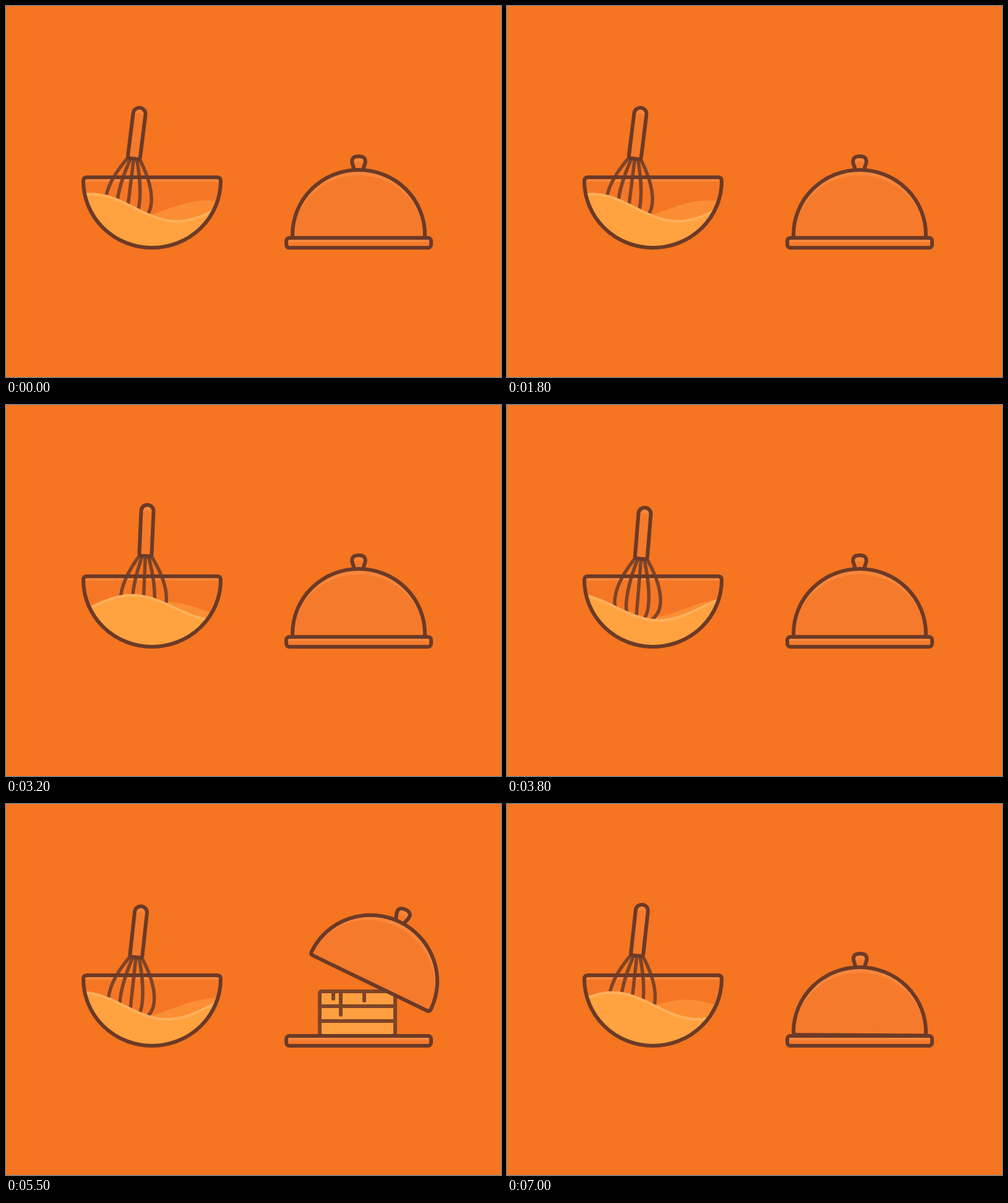
Recreate the animation shown at these times as an HTML page. Size 800 by 600 pixels, loop 7100 ms.

```html
<!DOCTYPE html>
<html lang="en">
<head>
<meta charset="utf-8">
<title>Whisk and cloche</title>
<style>
  html, body { margin: 0; height: 100%; overflow: hidden; background: #f57520; }
  svg { display: block; width: 800px; height: 600px; }
  .line { fill: none; stroke: #6b3a27; stroke-width: 6; stroke-linejoin: round; stroke-linecap: round; }
  .soft { fill: none; stroke: #7e4428; stroke-width: 6; stroke-linecap: round; }
  .glass { fill: #f57a2b; }
  .shine { fill: #f8873c; }
</style>
</head>
<body>
<svg viewBox="0 0 800 600">
  <defs>
    <path id="bowl" d="M131 277H341Q347 277 347 283A111 108 0 0 1 125 283Q125 277 131 277Z"/>
    <path id="dome" d="M467 375Q463 375 463 370A107 105 0 0 1 677 370Q677 375 673 375Z"/>
    <path id="handle" d="M-10 -73A10 10 0 0 1 10 -73V-4Q10 0 6 0H-6Q-10 0 -10 -4Z"/>
    <path id="knob" d="M563 265L559.5 254Q557.5 243 570 243Q582.5 243 580.5 254L577 265"/>
    <clipPath id="inBowl"><use href="#bowl"/></clipPath>
    <clipPath id="inDome"><use href="#dome"/></clipPath>
    <clipPath id="inHandle"><use href="#handle"/></clipPath>
    <clipPath id="inKnob"><use href="#knob"/></clipPath>
  </defs>

  <g clip-path="url(#inBowl)">
    <path fill="#f57725" d="M120 270h232v125H120z"/>
    <path class="shine" d="M120 277h232v7H120z"/>
    <path id="back" fill="#fb8e33"/>
  </g>
  <g id="whisk">
    <g class="soft" style="stroke-width:5.5">
      <path d="M0 0V106"/>
      <path id="wires" d="M-9 -1C-22 18 -37 45 -37 70C-37 95 -15 106 0 106S37 95 37 70C37 45 22 18 9 -1"/>
      <path d="M-5 0C-11 20 -18 45 -18 72C-18 95 -8 106 0 106S18 95 18 72C18 45 11 20 5 0"/>
    </g>
    <g clip-path="url(#inHandle)">
      <use href="#handle" class="shine"/>
      <use href="#handle" class="glass" y="9"/>
    </g>
    <use href="#handle" class="line"/>
  </g>
  <g clip-path="url(#inBowl)">
    <path id="front" fill="#ffb05c"/>
    <path id="body" fill="#ffa23f"/>
  </g>
  <use href="#bowl" class="line"/>

  <path fill="#ff9f40" d="M507 303h122v72H507z"/>
  <path class="soft" d="M511 303H625Q629 303 629 307V370Q629 375 624 375H512Q507 375 507 370V307Q507 303 511 303ZM507 327H629M507 351H629M529 303V315M541 303V341M579 303V318"/>

  <g id="lid">
    <g clip-path="url(#inKnob)">
      <use href="#knob" class="shine"/>
      <use href="#knob" class="glass" y="9"/>
    </g>
    <use href="#knob" class="line"/>
    <g clip-path="url(#inDome)">
      <use href="#dome" class="shine"/>
      <use href="#dome" class="glass" y="9"/>
      <path class="glass" d="M480 366h180v9H480z"/>
    </g>
    <use href="#dome" class="line"/>
  </g>

  <rect x="453" y="375" width="234" height="16" rx="5" class="glass"/>
  <path class="shine" d="M456 377h228v5H456z"/>
  <rect x="453" y="375" width="234" height="16" rx="5" class="line"/>
</svg>
<script>
  const LOOP = 7100, STIR = 1800, WAVELENGTH = 276;
  const $ = id => document.getElementById(id);
  const rad = deg => deg * Math.PI / 180;
  const ease = (t, from, to) => {
    const p = Math.min(1, Math.max(0, (t - from) / (to - from)));
    return (1 - Math.cos(Math.PI * p)) / 2;
  };

  function wave(crest, level, height) {
    let d = 'M116 400';
    for (let x = 116; x <= 356; x += 4) {
      const y = level - height * Math.cos((x - crest) / WAVELENGTH * 2 * Math.PI);
      d += `L${x} ${y.toFixed(2)}`;
    }
    return d + 'V400Z';
  }

  function draw(t) {
    const deg = 190 + 360 * t / STIR, a = rad(deg);
    const x = 235.5 + 29.5 * Math.cos(a);
    const y = 247 - 2.7 * Math.sin(a - rad(10));
    $('whisk').setAttribute('transform', `translate(${x} ${y}) rotate(${-7.2 * Math.cos(a)})`);

    const shift = WAVELENGTH * t / STIR;
    const crest = 142 - shift + 4 * Math.cos(a - rad(30));
    const level = 327 + 3 * Math.cos(a), height = 19.5 - 2.5 * Math.cos(a);
    $('front').setAttribute('d', wave(crest, level, height));
    $('body').setAttribute('d', wave(crest, level + 4.5, height));
    const backCrest = 323 + shift - 5 * Math.sin(a);
    $('back').setAttribute('d', wave(backCrest, 332 + 3 * Math.cos(a - rad(70)), 16));

    const open = ease(t, 3900, 5700) - ease(t, 6350, 7050);
    $('lid').setAttribute('transform',
      `translate(${20 * open ** 3} ${-88 * open}) rotate(${26.6 * open} 570 375)`);
  }

  const start = performance.now();
  function tick() {
    draw((performance.now() - start) % LOOP);
    requestAnimationFrame(tick);
  }
  tick();
</script>
</body>
</html>
```
